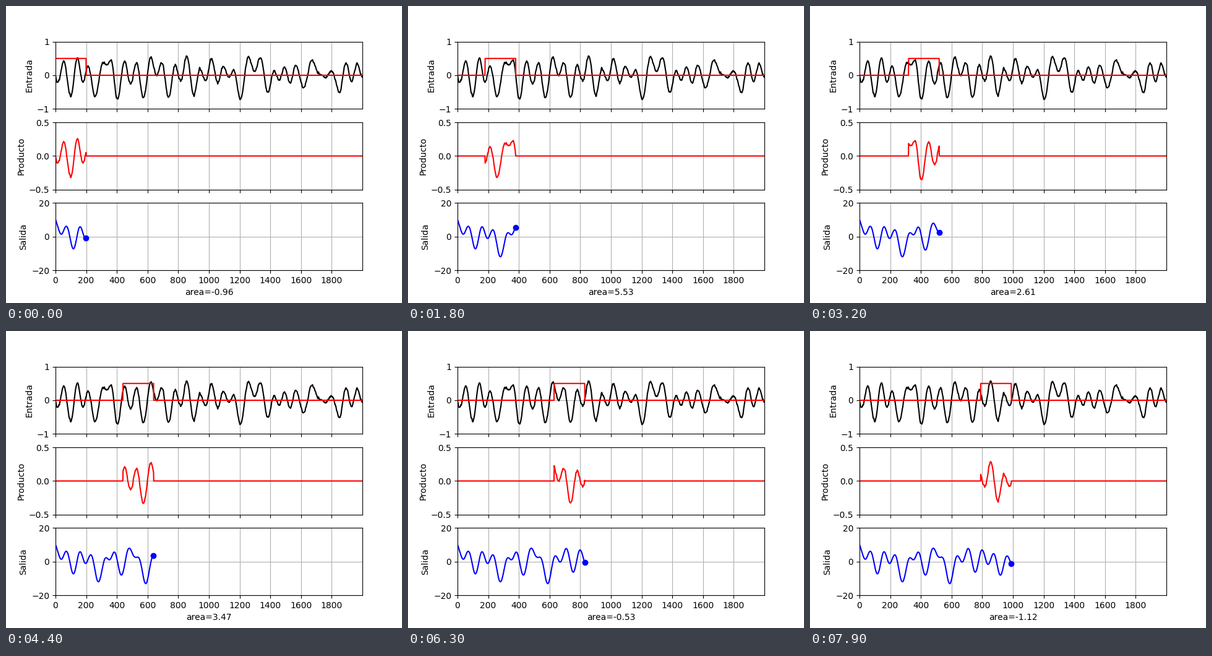
Write a matplotlib script that moves like this. It is 640x480 px and loops after 8000 ms.

```python
import numpy as np
import matplotlib.pyplot as plt
from matplotlib.animation import FuncAnimation

N, WIDTH, STEP = 2000, 200, 10
GAIN = 0.5
FRAMES, INTERVAL = 80, 100

# Successive crests and troughs of the input, by the sample where each run starts
SWINGS = {
    -180: [.4, -.04, .34, -.5, .4, -.22, .4],
    99: [-.63, .5, -.18],
    212: [.27, -.62],
    308: [.36, .32, .45],
    403: [-.72, .42, -.26, .37, -.67, .53],
    658: [0, .39, -.66, .3, -.17],
    855: [.56, -.58, .19, -.17, .49],
    1057: [-.23, .27, -.06, .16],
    1205: [-.72, .55, .1, .53],
    1384: [-.52, .12, -.14, .23, -.22],
    1566: [.29, -.37],
    1671: [.45, .05, -.06, .13],
    1851: [-.49, .37, -.17, .33],
    N: [-.05],
}


def swing_curve(swings, t):
    """Half-cosine swings; a taller swing takes longer within its run."""
    levels = np.concatenate(list(swings.values()))
    clock = np.append(0, np.cumsum(2 + np.abs(np.diff(levels))))
    first = np.cumsum([0] + [len(run) for run in swings.values()])[:-1]
    times = np.interp(clock, clock[first], list(swings))
    pos = np.interp(t, times, np.arange(len(levels)))
    i = np.minimum(pos.astype(int), len(levels) - 2)
    ease = (1 - np.cos(np.pi * (pos - i))) / 2
    return levels[i] + (levels[i + 1] - levels[i]) * ease


# The signal starts one window early so the output is full at sample 0
t = np.arange(1 - WIDTH, N)
rng = np.random.default_rng(4)
ripple = np.convolve(rng.normal(size=len(t)), np.hanning(9), "same")
history = swing_curve(SWINGS, t) + 0.016 * ripple / ripple.std()
output = np.convolve(history, np.full(WIDTH, GAIN), "valid")
signal = history[-N:]
n = np.arange(N)

fig, axes = plt.subplots(3, 1, sharex=True, figsize=(6.4, 4.8), dpi=100)
top, mid, low = axes
for ax, name, lim in zip(axes, ("Entrada", "Producto", "Salida"), (1, .5, 20)):
    ax.set_ylabel(name)
    ax.set_ylim(-lim, lim)
    ax.set_yticks([-lim, 0, lim])
    ax.grid(True)
low.set_xlim(0, N)
low.set_xticks(np.arange(0, N, 200))

top.plot(n, signal, "k")
pulse_line, = top.plot([], [], "r")
product_line, = mid.plot([], [], "r")
output_line, = low.plot([], [], "b")
dot, = low.plot([], [], "bo")
label = low.set_xlabel("")


def update(k):
    start = k * STEP
    end = start + WIDTH
    pulse = np.where((n >= start) & (n < end), GAIN, 0)
    pulse_line.set_data(n, pulse)
    product_line.set_data(n, signal * pulse)
    output_line.set_data(n[:end], output[:end])
    dot.set_data([end - 1], [output[end - 1]])
    label.set_text(f"area={output[end - 1]:.2f}")
    return pulse_line, product_line, output_line, dot, label


anim = FuncAnimation(fig, update, frames=FRAMES, interval=INTERVAL,
                     repeat=True, repeat_delay=0)
plt.show()
```
